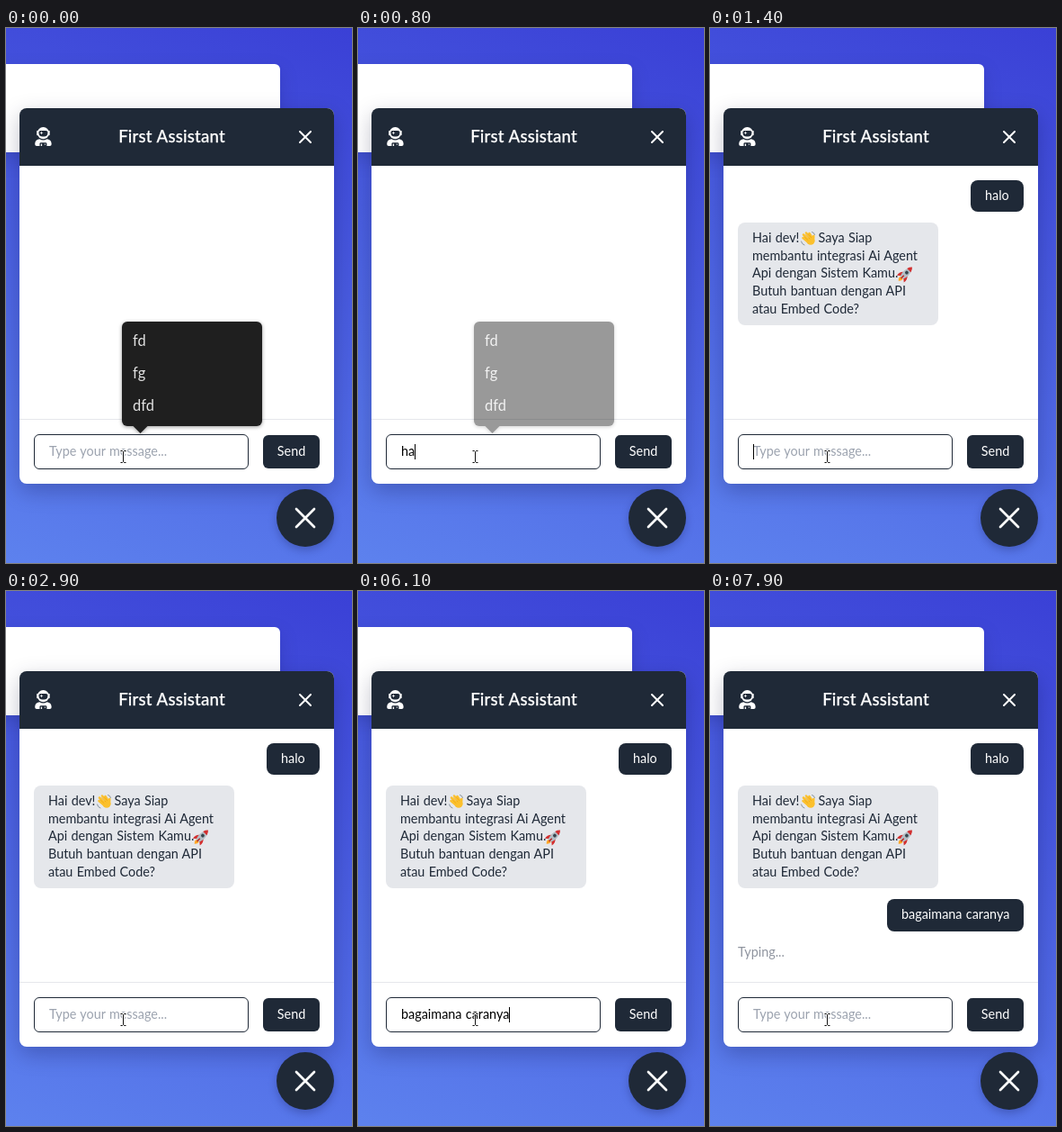
Recreate the animation shown at these times as an HTML page. Size 385 by 594 pixels, loop 8000 ms.

```html
<!DOCTYPE html>
<html lang="id">
<head>
<meta charset="utf-8">
<title>Chat widget</title>
<style>
  html, body { margin: 0; width: 100%; height: 100%; overflow: hidden; background: #4a5fe2; }
  svg { display: block; width: 385px; height: 594px; }
  text {
    font: 14.4px Lato, "Open Sans", sans-serif;
    word-spacing: .6px;
    white-space: pre;
    fill: #1f2937;
  }
  .light { fill: #fff; }
  .title { font-size: 18.6px; font-weight: 500; letter-spacing: .2px; stroke: #fff; stroke-width: .25px; }
  .hint { fill: #9ca3af; }
  .typing { fill: #6b7280; }
  #typed { fill: #000; }
  .options text { font-size: 16.4px; fill: #e3e3e3; }
  .dark { fill: #1f2937; }
  .cross { fill: none; stroke: #fff; stroke-linecap: round; }
  .card { filter: drop-shadow(0 8px 10px rgba(0, 0, 40, .14)); }
  .panel { filter: drop-shadow(0 8px 12px rgba(0, 0, 40, .24)); }
  .toggle { filter: drop-shadow(0 4px 5px rgba(0, 0, 40, .22)); }
  .options { filter: drop-shadow(0 1px 2px rgba(0, 0, 0, .4)); }
</style>
</head>
<body>
<svg viewBox="0 0 385 594">
  <defs>
    <linearGradient id="sky" gradientUnits="userSpaceOnUse" x1="385" y1="0" x2="142" y2="651">
      <stop offset="0" stop-color="#3a40d6"/>
      <stop offset="1" stop-color="#5d82ee"/>
    </linearGradient>
  </defs>
  <rect width="385" height="594" fill="url(#sky)"/>
  <rect class="card" x="-40" y="40" width="345" height="98" rx="6" fill="#fff"/>

  <rect class="panel" x="15" y="89" width="350" height="417" rx="8" fill="#fff"/>
  <path class="dark" d="M15 153V97a8 8 0 0 1 8-8H357a8 8 0 0 1 8 8V153Z"/>
  <text class="title light" x="184.5" y="126.5" text-anchor="middle">First Assistant</text>
  <path class="cross" stroke-width="2" d="M327 115l12 12m0-12l-12 12"/>

  <!-- astronaut -->
  <g transform="translate(32.2 110) scale(.0412)" fill="#fff">
    <circle cx="224" cy="160" r="160"/>
    <rect x="48" y="96" width="352" height="128" rx="16"/>
    <path class="dark" d="M104 136q0-40 48-40H296q48 0 48 40v24a96 96 0 0 1-96 96H200a96 96 0 0 1-96-96Z"/>
    <path d="M176 208l12-36 36-12-36-12-12-36-12 36-36 12 36 12Z"/>
    <path d="M120 321q104 62 208 0Q448 340 448 454v10q0 48-48 48H48q-48 0-48-48v-10Q0 340 120 321Z"/>
    <path class="dark" d="M128 512v-64q0-32 32-32H288q32 0 32 32v64Z"/>
    <path d="M160 512v-48a16 16 0 0 1 32 0v48Z"/>
    <circle cx="272" cy="464" r="18"/>
  </g>

  <g id="first">
    <rect class="dark" x="290" y="169" width="59" height="35" rx="8"/>
    <text class="light" x="306" y="191">halo</text>
    <rect x="31" y="216" width="223" height="114" rx="8" fill="#e5e7eb"/>
    <text x="47" y="238">Hai dev!</text>
    <text x="120.5" y="238">Saya Siap</text>
    <text x="47" y="257.7">membantu integrasi Ai Agent</text>
    <text x="47" y="277.4">Api dengan Sistem Kamu.</text>
    <text x="47" y="297.1">Butuh bantuan dengan API</text>
    <text x="47" y="316.8">atau Embed Code?</text>

    <!-- waving hand -->
    <g transform="translate(109 233.5)" fill="none" stroke-linecap="round">
      <path d="M-5.5-.5L1 5M-5-4L2 3M-2-6L4 1M1.5-5.5L5 0M6 3L6.3-2.5" stroke="#fbc02d" stroke-width="2.5"/>
      <ellipse cx="3" cy="3" rx="4.6" ry="4.2" fill="#fbc02d"/>
      <path d="M-4-1.5L0 2M-2.5-4L2 .5M.5-4.5L3.5-1" stroke="#e59600" stroke-width=".5"/>
      <path d="M4.5-7q2.5.5 3 3M-7.5 3.5q.5 3 3.5 4" stroke="#7d8b96" stroke-width=".9"/>
    </g>

    <!-- rocket -->
    <g transform="translate(217.5 273) rotate(45)">
      <path d="M-2 6Q-2.5 9 0 11Q2.5 9 2 6Z" fill="#ffa726"/>
      <path d="M-3 0Q-6.5 3 -5.5 8L-2.5 5.5H2.5L5.5 8Q6.5 3 3 0Z" fill="#d32f2f"/>
      <path d="M0-10Q-4.5-5 -3.3 2L-2.3 6H2.3L3.3 2Q4.5-5 0-10Z" fill="#b4bec5"/>
      <path d="M0-10.5Q-2.2-8.5 -3-5.5H3Q2.2-8.5 0-10.5Z" fill="#d32f2f"/>
      <circle cy="-2" r="1.9" fill="#37474f"/>
      <path d="M0 2.5V7" stroke="#b71c1c" stroke-width="1.3"/>
    </g>
  </g>

  <g id="second">
    <rect class="dark" x="197" y="342" width="152" height="36" rx="8"/>
    <text class="light" x="213" y="364">bagaimana caranya</text>
    <text id="typing" class="typing" x="31" y="406">Typing...</text>
  </g>

  <rect x="15" y="434" width="350" height="1" fill="#e5e7eb"/>
  <rect x="31.5" y="451.5" width="238" height="38" rx="5.5" fill="#fff" stroke="#1f2937"/>
  <text id="hint" class="hint" x="48" y="475">Type your message...</text>
  <text id="typed" x="48" y="475"></text>
  <rect id="caret" y="462" width="1" height="17"/>
  <rect class="dark" x="286" y="452" width="63" height="37" rx="6"/>
  <text class="light" x="317.5" y="475" text-anchor="middle">Send</text>

  <g id="options" class="options">
    <path d="M141 441.5H158L149.5 450Z" fill="#1f1f1f"/>
    <rect x="129" y="326" width="156" height="116" rx="6" fill="#1f1f1f"/>
    <text x="141" y="353">fd</text>
    <text x="141" y="389">fg</text>
    <text x="141" y="425">dfd</text>
  </g>

  <circle class="toggle dark" cx="333" cy="544" r="32"/>
  <path class="cross" stroke-width="2.7" d="M323 534l20 20m0-20l-20 20"/>

  <!-- text pointer -->
  <g fill="none">
    <path d="M127.5 469.5h2l1 1 1-1h2M130.5 470.5v11M127.5 482.5h2l1-1 1 1h2" stroke="#fff" stroke-width="2.6"/>
    <path d="M127.5 469.5h2l1 1 1-1h2M130.5 470.5v11M127.5 482.5h2l1-1 1 1h2" stroke="#111"/>
  </g>
</svg>
<script>
  const LOOP = 8000, STEP = 100, BLINK = 600;
  const $ = id => document.getElementById(id);

  // Each message: key times, with the number of characters each one adds.
  const messages = [
    { text: "halo", sent: 1400,
      keys: [[700, 1], [800, 1], [900, 1], [1100, 1]] },
    { text: "bagaimana caranya", sent: 6400,
      keys: [[4300, 1], [4400, 1], [4500, 1], [4600, 1], [4700, 1], [4900, 2],
             [5100, 1], [5200, 1], [5300, 1], [5400, 1], [5500, 1],
             [5700, 1], [5800, 1], [5900, 1], [6100, 2]] }
  ];

  function inputAt(t) {
    let text = "", lastKey = 300;
    for (const m of messages) {
      const past = m.keys.filter(([at]) => at <= t);
      if (!past.length) continue;
      lastKey = past[past.length - 1][0];
      const count = past.reduce((sum, [, n]) => sum + n, 0);
      text = t < m.sent ? m.text.slice(0, count) : "";
    }
    return { text, caretOn: t >= lastKey && Math.floor((t - lastKey) / BLINK) % 2 === 0 };
  }

  const ease = x => x * x * (3 - 2 * x);

  function pulse(ms) {
    const p = (ms % 2000) / 1000;
    return 1 - ease(p < 1 ? p : 2 - p) / 2;
  }

  const show = (id, on) => $(id).setAttribute("visibility", on ? "visible" : "hidden");

  function draw(t) {
    const { text, caretOn } = inputAt(t);
    $("typed").textContent = text;
    show("hint", !text);
    show("caret", caretOn);
    const width = text ? $("typed").getComputedTextLength() : 0;
    $("caret").setAttribute("x", Math.round(48 + width));

    const fade = t < 700 ? 1 : t < 800 ? .91 : t < 900 ? .45 : 0;
    $("options").setAttribute("opacity", fade);

    show("first", t >= messages[0].sent);
    show("second", t >= messages[1].sent);
    $("typing").setAttribute("opacity", pulse(Math.max(0, t - messages[1].sent)));
  }

  const start = performance.now();
  function tick() {
    const t = (performance.now() - start) % LOOP;
    draw(Math.floor(t / STEP) * STEP);
    requestAnimationFrame(tick);
  }
  tick();
</script>
</body>
</html>
```
